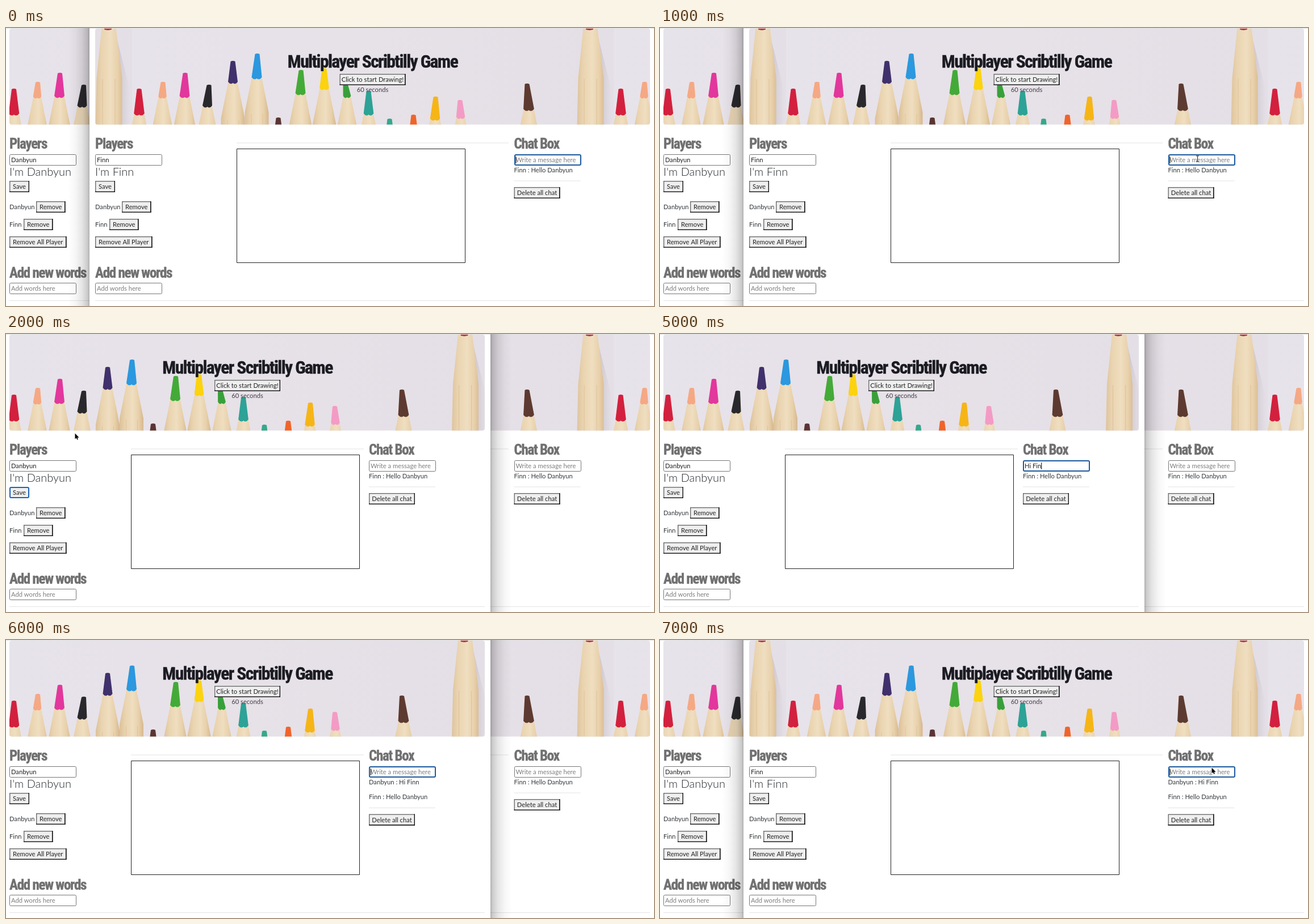
An HTML page with a canvas that plays this animation: 1141 px wide and 491 px high, repeating every 8 s.

```html
<!DOCTYPE html>
<html lang="en">
<head>
<meta charset="utf-8">
<title>Drawing game chat</title>
<style>
  html, body { margin: 0; width: 100%; height: 100%; overflow: hidden; background: #fff; }
  canvas { display: block; width: 100vw; height: 100vh; }
</style>
</head>
<body>
<canvas id="stage" width="1141" height="491"></canvas>
<script>
const ctx = document.getElementById('stage').getContext('2d');
const W = 1141, H = 491, LOOP = 8000, TILE = 848;
const BODY = 'Lato, "Open Sans", sans-serif';
const HEAD = '"Roboto Condensed", Roboto, "Open Sans", sans-serif';
const HOST = 'Danbyun', GUEST = 'Finn';
const INK = '#33383c', HINT = '#7d7d7d', FOCUS = '#1d5a9c';

// tip x, tip y, lead bottom, lean, colour
const PENCILS = [
  [14, 107, 153, 0, '#d3203f'],
  [56, 95, 123, -1, '#f5a884'],
  [377, 97, 122, 3, '#38a03a'],
  [95, 79, 122, -1, '#e2379c'],
  [137, 100, 139, -3, '#29292d'],
  [179, 58, 97, 0, '#40306c'],
  [222, 45, 89, -1, '#2b98df'],
  [259, 158, 182, 0, '#5a3434'],
  [299, 74, 117, -1, '#43aa38'],
  [340, 71, 108, 0, '#fbd30f'],
  [418, 111, 153, 0, '#2da296'],
  [455, 160, 190, 0, '#34a88d'],
  [497, 153, 185, 0, '#f0642b'],
  [536, 121, 162, -1, '#f6b517'],
  [579, 127, 159, 1, '#f39bc5'],
  [697, 98, 145, 3, '#5d3a31']
];

const left = { x: 6, right: 843, mid: 425, board: 220, rule: 630, chat: 639, art: 0, name: HOST };
const right = { x: 157, right: 1134, mid: 645.5, board: 406, rule: 885, chat: 894.5, art: 220.5, name: GUEST };

function text(str, x, y, color = INK, size = 11.2, align = 'left', weight = 400) {
  ctx.font = `${weight} ${size}px ${BODY}`;
  ctx.textAlign = align;
  ctx.fillStyle = color;
  ctx.fillText(str, x, y);
}

function heading(str, x, y, size = 25, color = '#707070', align = 'left') {
  ctx.save();
  ctx.font = `900 condensed ${size}px ${HEAD}`;
  ctx.letterSpacing = `${-0.05 * size}px`;
  ctx.textAlign = align;
  ctx.fillStyle = ctx.strokeStyle = color;
  ctx.lineWidth = 0.4;
  ctx.fillText(str, x, y);
  ctx.strokeText(str, x, y);
  ctx.restore();
}

function rule(x1, x2, y) {
  ctx.fillStyle = '#e4e4e4';
  ctx.fillRect(x1, y, x2 - x1, 1);
}

function box(x, y, w, h, r, fill, stroke, line) {
  ctx.beginPath();
  ctx.roundRect(x + line / 2, y + line / 2, w - line, h - line, r);
  ctx.fillStyle = fill;
  ctx.fill();
  ctx.strokeStyle = stroke;
  ctx.lineWidth = line;
  ctx.stroke();
}

function button(label, x, y, w, focused) {
  const h = 20;
  if (focused) {
    box(x, y, w, h, 2, '#efefef', '#1b62b8', 2);
  } else {
    ctx.fillStyle = '#6c6c6c';
    ctx.fillRect(x, y, w, h);
    ctx.fillStyle = '#111';
    ctx.fillRect(x, y + h - 1.5, w, 1.5);
    ctx.fillRect(x + w - 1.5, y, 1.5, h);
    ctx.fillStyle = '#efefef';
    ctx.fillRect(x + 1.4, y + 1.4, w - 2.9, h - 2.9);
  }
  text(label, x + w / 2, y + 14, '#222', 11.2, 'center');
}

function input(x, y, value, hint, focused) {
  box(Math.round(x), y, 118, 20, 2, '#fff', focused ? FOCUS : '#767676', focused ? 2 : 1);
  text(value || hint, x + 3, y + 13.5, value ? '#222' : HINT);
  if (focused) {
    const end = value ? ctx.measureText(value).width : 0;
    ctx.fillStyle = '#000';
    ctx.fillRect(x + 3 + end, y + 4, 1, 12);
  }
}

function wood(x, half) {
  const g = ctx.createLinearGradient(x - half, 0, x + half, 0);
  g.addColorStop(0, '#dcc19a');
  g.addColorStop(0.25, '#ead4b0');
  g.addColorStop(0.55, '#efdec0');
  g.addColorStop(0.8, '#e8d0aa');
  g.addColorStop(1, '#d6b88e');
  return g;
}

function shape(points, fill) {
  ctx.beginPath();
  points.forEach(([x, y]) => ctx.lineTo(x, y));
  ctx.fillStyle = fill;
  ctx.fill();
}

function pencil([x, top, end, lean, color]) {
  const tip = 4, widest = 21, base = x + lean;
  const e = tip + (end - top) * 0.115;
  const knee = end + (widest - e) / 0.2;
  shape([[x - tip, top + 1], [x + tip, top + 1], [base + e, end], [base + widest, knee],
    [base + widest, 400], [base - widest, 400], [base - widest, knee], [base - e, end]],
    wood(base, widest));
  if (knee < 170) {
    ctx.fillStyle = 'rgba(172,128,76,.2)';
    ctx.fillRect(base - 10, knee + 3, 1, 60);
    ctx.fillRect(base + 10, knee + 3, 1, 60);
  }
  ctx.beginPath();
  ctx.moveTo(x - tip, top + 1);
  ctx.quadraticCurveTo(x, top - 1, x + tip, top + 1);
  ctx.lineTo(base + e, end - 2);
  ctx.quadraticCurveTo(base + e / 2, end + 4, base, end);
  ctx.quadraticCurveTo(base - e / 2, end + 4, base - e, end - 2);
  ctx.fillStyle = color;
  ctx.fill();
}

function bigPencil() {
  const shade = ctx.createLinearGradient(826, 0, 846, 0);
  shade.addColorStop(0, 'rgba(135,118,130,.2)');
  shade.addColorStop(1, 'rgba(135,118,130,0)');
  shape([[818, 0], [846, 110], [846, 175], [826, 175]], shade);
  shape([[796, 0], [821, 0], [832, 88], [832, 175], [785, 175], [787, 88]], wood(809, 26));
  ctx.fillStyle = 'rgba(160,116,66,.2)';
  ctx.fillRect(797, 90, 1, 85);
  ctx.fillRect(819, 90, 1, 85);
  shape([[800, 0], [814, 0], [813, 3], [807, 4], [801, 3]], '#b9373a');
}

function banner(page) {
  ctx.save();
  ctx.beginPath();
  ctx.roundRect(page.x, 1, page.right - page.x, 169.5, 4);
  ctx.clip();
  for (let k = -1; k <= 1; k++) {
    ctx.save();
    ctx.translate(page.art + k * TILE, 0);
    ctx.beginPath();
    ctx.rect(1.5, 0, TILE, 171);
    ctx.clip();
    const sky = ctx.createLinearGradient(0, 0, TILE, 0);
    sky.addColorStop(0, '#e7e3ea');
    sky.addColorStop(0.5, '#e7e1e8');
    sky.addColorStop(1, '#e4dfe6');
    ctx.fillStyle = sky;
    ctx.fillRect(0, 0, TILE + 3, 171);
    PENCILS.forEach(pencil);
    bigPencil();
    ctx.restore();
  }
  ctx.restore();
  heading('Multiplayer Scribtilly Game', page.mid, 70, 31.5, '#1b1b22', 'center');
  button('Click to start Drawing!', page.mid - 58, 81, 116);
  text('60 seconds', page.mid, 112.5, '#443f4a', 11.2, 'center');
}

function players(page, saveFocused) {
  const x = page.x;
  heading('Players', x, 213);
  input(x, 223, page.name);
  text("I'm " + page.name, x, 260.5, '#212529', 20, 'left', 300);
  button('Save', x, 270, 35, saveFocused);
  text(HOST, x, 320);
  button('Remove', x + 47, 306, 51.5);
  text(GUEST, x, 351);
  button('Remove', x + 25, 337, 51.5);
  button('Remove All Player', x, 368, 100.5);
  heading('Add new words', x, 440.5);
  input(x, 450, '', 'Add words here');
  rule(x, page.right, 481);
}

function chat(x, state) {
  heading('Chat Box', x, 213);
  input(x, 223, state.typed, 'Write a message here', state.focused);
  let y = 254.5;
  if (state.replied) {
    text(`${HOST} : Hi ${GUEST}`, x, y);
    y += 26.5;
  }
  text(`${GUEST} : Hello ${HOST}`, x, y);
  rule(x, x + 117, y + 15);
  button('Delete all chat', x, y + 26.5, 81);
}

function windowPage(page, from, to, state) {
  ctx.save();
  ctx.beginPath();
  ctx.rect(from, 0, to - from, H);
  ctx.clip();
  ctx.fillStyle = '#fff';
  ctx.fillRect(from, 0, to - from, H);
  rule(from, to, 0);
  banner(page);
  players(page, state.save);
  rule(page.board, page.rule, 202.5);
  box(page.board, 213, 403, 202, 0, '#fff', '#222', 1);
  chat(page.chat, state);
  ctx.restore();
}

function shadow(edge, dir) {
  const far = edge + dir * 38;
  const g = ctx.createLinearGradient(edge, 0, far, 0);
  g.addColorStop(0, 'rgba(0,0,0,.31)');
  g.addColorStop(0.1, 'rgba(0,0,0,.2)');
  g.addColorStop(0.35, 'rgba(0,0,0,.1)');
  g.addColorStop(0.65, 'rgba(0,0,0,.035)');
  g.addColorStop(1, 'rgba(0,0,0,0)');
  ctx.fillStyle = g;
  ctx.fillRect(Math.min(edge, far), 0, 38, H);
}

function arrow(x, y) {
  ctx.beginPath();
  [[0, 0], [0, 10], [2.3, 8], [3.8, 11.3], [5.4, 10.6], [4, 7.4], [7, 7.2]]
    .forEach(([dx, dy]) => ctx.lineTo(x + dx, y + dy));
  ctx.closePath();
  ctx.strokeStyle = '#fff';
  ctx.lineWidth = 1.4;
  ctx.stroke();
  ctx.fillStyle = '#000';
  ctx.fill();
}

function beam(x, y) {
  ctx.fillStyle = '#222';
  ctx.fillRect(x - 0.5, y - 5, 1, 10);
  ctx.fillRect(x - 2.5, y - 5.5, 5, 1);
  ctx.fillRect(x - 2.5, y + 4.5, 5, 1);
}

function draw(now) {
  const sec = Math.floor(now % LOOP / 1000);
  ctx.clearRect(0, 0, W, H);
  if (sec < 2 || sec === 7) {
    windowPage(left, 0, 147, {});
    shadow(147, -1);
    windowPage(right, 147, W, { focused: true, replied: sec === 7 });
  } else {
    const typed = sec === 4 ? 'Hi' : sec === 5 ? 'Hi ' + GUEST.slice(0, 3) : '';
    windowPage(right, 853, W, {});
    shadow(853, 1);
    windowPage(left, 0, 853, { save: sec === 2, focused: sec > 2, typed, replied: sec === 6 });
  }
  if (sec === 1) beam(946.5, 231);
  if (sec === 2) arrow(121.5, 175.5);
  if (sec === 3) beam(692, 231);
  if (sec === 7) arrow(971.5, 225.5);
}

const start = performance.now();
function tick() {
  draw(performance.now() - start);
  requestAnimationFrame(tick);
}
tick();
</script>
</body>
</html>
```
